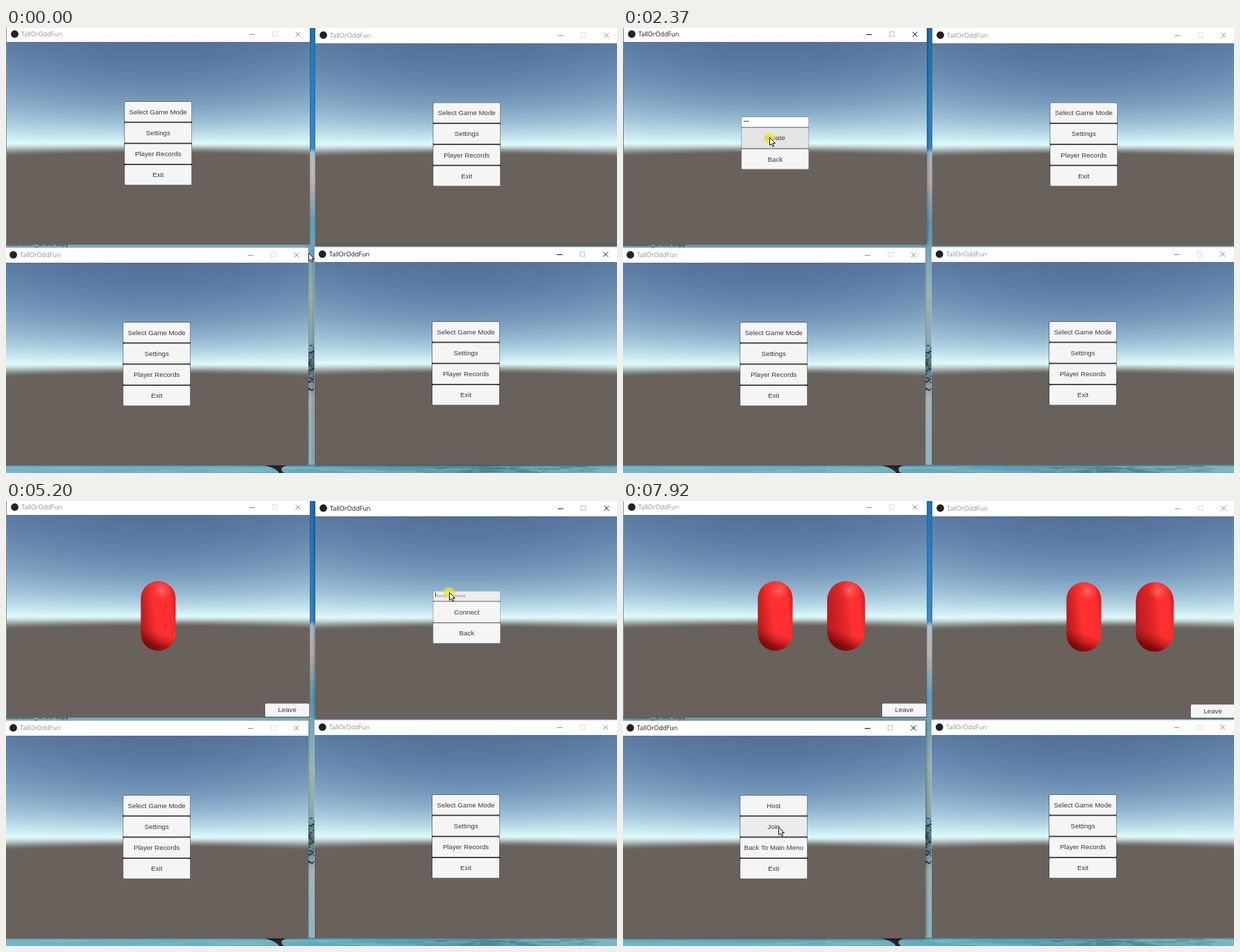
Recreate the animation shown at these times as an HTML page with a canvas. Size 877 px wide and 639 px high, loop 7.99 s.

```html
<!DOCTYPE html>
<html lang="en">
<head>
<meta charset="utf-8">
<title>Four game windows</title>
<style>
html, body { margin: 0; width: 877px; height: 639px; overflow: hidden; }
canvas { display: block; }
</style>
</head>
<body>
<canvas id="stage" width="877" height="639"></canvas>
<script>
const LOOP = 7990, CLICK = 220, TYPING = 5340;
const c = document.getElementById('stage').getContext('2d');
const UI = '"Liberation Sans", Arial, sans-serif';

const WINDOWS = [[0, 0], [443, 1.5], [-2, 317], [441.7, 316]];
const MENUS = {
  main: ['Select Game Mode', 'Settings', 'Player Records', 'Exit'],
  modes: ['Host', 'Join', 'Back To Main Menu', 'Exit']
};

// cursor stops: arrive, leave, x, y and, for clicks, window and screen opened
const STOPS = [
  [0, 70, 434, 323],
  [540, 690, 202, 121, 0, 'modes'],
  [740, 800, 200, 124, 0, 'create'],
  [1790, 2560, 210, 157, 0, 'game'],
  [3140, 3270, 672, 180],
  [3900, 4140, 660, 122, 1, 'modes'],
  [4330, 4550, 656, 148, 1, 'connect'],
  [5110, 5330, 636, 131, 1, 'connect'],
  [5970, 6380, 654, 155, 1, 'game'],
  [6870, 6890, 194, 357],
  [7200, 7420, 213, 432, 2, 'modes'],
  [7910, LOOP, 223, 468]
];

const smooth = u => {
  u = Math.min(1, Math.max(0, u));
  return u * u * (3 - 2 * u);
};
const mix = (a, b, u) => a + (b - a) * u;

function cursorAt(t) {
  const i = STOPS.findIndex(([, leave]) => t < leave);
  const [arrive, , x, y] = STOPS[i];
  if (t >= arrive) return [x, y];
  const [, left, x0, y0] = STOPS[i - 1];
  const e = smooth((t - left) / (arrive - left));
  return [mix(x0, x, e), mix(y0, y, e)];
}

// replay the clicks up to time t
function stateAt(t) {
  const state = { screens: ['main', 'main', 'main', 'main'], active: 3, press: 0 };
  for (const [arrive, leave, , , win, screen] of STOPS) {
    const down = Math.max(arrive, leave - CLICK);
    if (!screen || t < down) continue;
    state.active = win;
    if (t < leave) state.press = Math.min(1, (t - down + 1) / 80);
    else state.screens[win] = screen;
  }
  return state;
}

function rect(x, y, w, h, fill) {
  c.fillStyle = fill;
  c.fillRect(x, y, w, h);
}

function round(x, y, w, h, r, fill) {
  c.fillStyle = fill;
  c.beginPath();
  c.roundRect(x, y, w, h, r);
  c.fill();
}

function disc(x, y, r, fill) {
  c.fillStyle = fill;
  c.beginPath();
  c.arc(x, y, r, 0, 7);
  c.fill();
}

function text(s, x, y, font, fill, align = 'left') {
  c.font = font;
  c.fillStyle = fill;
  c.textAlign = align;
  c.fillText(s, x, y);
}

function line(x0, y0, x1, y1, color) {
  c.strokeStyle = color;
  c.lineWidth = 1;
  c.beginPath();
  c.moveTo(x0, y0);
  c.lineTo(x1, y1);
  c.stroke();
}

function ramp(x0, y0, x1, y1, stops) {
  const g = c.createLinearGradient(x0, y0, x1, y1);
  stops.forEach(([p, color]) => g.addColorStop(p, color));
  return g;
}

function layer(w, h, paint) {
  const canvas = document.createElement('canvas');
  canvas.width = w;
  canvas.height = h;
  paint(canvas.getContext('2d'));
  return canvas;
}

// haze grows exponentially towards the horizon, then blends into the ground
function skyColor(y) {
  const haze = (zenith, horizon, depth) =>
    mix(zenith, horizon, Math.exp(Math.min(y, 0) / depth));
  const sky = [haze(74, 222, 52), haze(97, 250, 62), haze(136, 251, 76)];
  const ground = [104, 97, 92], g = smooth((y + 1) / 16);
  return `rgb(${sky.map((v, i) => mix(v, ground[i], g))})`;
}

// equal elevations spread apart away from the middle of the view
const SKY = layer(435, 291, s => {
  for (let x = 0; x < 435; x++) {
    const reach = Math.hypot(1, (x - 217) / 251);
    for (let y = 0; y < 291; y++) {
      s.fillStyle = skyColor((y - 145) / reach);
      s.fillRect(x, y, 1, 1);
    }
  }
});

function streaks(x, y, w, h, n, color) {
  let seed = 7;
  const rnd = () => (seed = seed * 16807 % 2147483647) / 2147483647;
  for (let i = 0; i < n; i++) {
    rect(x + rnd() * w, y + rnd() * h, 3 + rnd() * w / 8, 1.5, color);
  }
}

function desktop() {
  rect(0, 0, 877, 639, '#7fafbc');
  rect(430, 0, 16, 639, ramp(0, 0, 0, 639, [[0, '#2273b4'], [.27, '#3c8ac6'],
    [.28, '#a9c3d2'], [.34, '#c4b5ad'], [.44, '#5d9fc0'], [.6, '#9db5b0'],
    [.71, '#8ba9b0'], [.76, '#55737f'], [.83, '#a4b5b8'], [1, '#8db6c2']]));
  streaks(430, 455, 12, 70, 45, '#2b3d4a');
  text('Illustration_of the copy', 0, 313, '9px ' + UI, '#263038');
  rect(0, 627, 877, 12, ramp(0, 0, 877, 0,
    [[0, '#74b4c8'], [.5, '#65a9bd'], [.77, '#5b94a5'], [1, '#79b4c4']]));
  streaks(0, 628, 877, 11, 30, 'rgba(150,205,215,.3)');
  streaks(600, 628, 240, 11, 30, 'rgba(45,85,100,.3)');
  rect(0, 627, 877, 2, 'rgba(50,75,85,.35)');
  c.fillStyle = '#2a2227';
  c.beginPath();
  c.moveTo(371, 628);
  c.lineTo(403, 628);
  c.quadraticCurveTo(390, 632, 399, 639);
  c.lineTo(392, 639);
  c.quadraticCurveTo(388, 632, 371, 628);
  c.fill();
}

function frame(active) {
  c.shadowColor = active ? 'rgba(0,0,0,.55)' : 'rgba(0,0,0,.3)';
  c.shadowBlur = active ? 7 : 3;
  rect(1, -1.5, 435, 312, '#fff');
  c.shadowBlur = 0;
  c.shadowColor = 'transparent';
  const ink = active ? '#111' : '#8b8f92';
  disc(12.5, 8.7, 5.4, '#222');
  text('TallOrOddFun', 22, 12, '9px "Open Sans", sans-serif', ink);
  line(349, 9.5, 357, 9.5, ink);
  c.strokeStyle = active ? '#b5c1bf' : '#dcdcdc';
  c.strokeRect(382.5, 5.5, 6.5, 6.5);
  line(415.5, 5.5, 422.5, 12.5, ink);
  line(422.5, 5.5, 415.5, 12.5, ink);
  c.drawImage(SKY, 1, 20);
}

// a control darkens under the mouse and again while pressed
function control(x, y, w, h, mouse, base = 245) {
  const [mx, my, press] = mouse;
  const inside = mx > x && mx < x + w && my > y && my < y + h;
  const v = inside ? 236 - 18 * press : base;
  round(x, y, w, h, 1.5, `rgb(${v},${v},${v})`);
}

function button(label, x, y, w, h, mouse) {
  control(x, y, w, h, mouse);
  text(label, x + w / 2, y + h / 2 + 3.2, '9.7px ' + UI, '#3a3a3a', 'center');
}

function menu(labels, mouse) {
  round(169.7, 105.5, 97, 120, 2, '#33373b');
  labels.forEach((s, i) => button(s, 170.3, 106 + i * 30.25, 96, 28.6, mouse));
}

function panel(action, typed, caret, mouse) {
  round(169.7, 127.5, 97, 76, 2, '#7b8083');
  control(170.3, 128, 96, 14, [mouse[0], mouse[1], 0], 253);
  if (typed) text('*'.repeat(typed), 173, 136.6, 'bold 5px ' + UI, '#444');
  else text('Server password', 174, 136, 'italic 5.6px ' + UI, '#8c8c8c');
  if (caret) rect(173, 130, 1, 6, '#333');
  button(action, 170.3, 143.3, 96, 29.2, mouse);
  button('Back', 170.3, 174, 96, 28.6, mouse);
}

// lit is where, across the width, the left shade gives way to full light
function capsule(x, w, lit) {
  const y = 115, h = 100, r = w / 2;
  const coat = fill => round(x, y, w, h, r, fill);
  coat(ramp(x, y + 50, x + w, y + 44, [[0, '#b81c1e'], [lit / 2, '#cf2123'],
    [lit, '#ea282a'], [lit + .12, '#fd2f31'], [.88, '#fd2f31'], [1, '#d92426']]));
  coat(ramp(x + r + 5, y + 76, x + r - 3, y + h, [[0, 'rgba(90,0,0,0)'],
    [.4, 'rgba(100,0,0,.3)'], [.7, 'rgba(85,0,0,.6)'], [1, 'rgba(75,0,0,.7)']]));
  const glow = c.createRadialGradient(x + r + 5, y + 13, 0, x + r + 5, y + 13, 14);
  glow.addColorStop(0, 'rgba(255,150,145,.55)');
  glow.addColorStop(1, 'rgba(255,110,110,0)');
  coat(glow);
}

function game(joined, mouse) {
  capsule(193.5, 50, .3);
  if (joined) capsule(293, 54.5, .5);
  round(371.5, 290, 64.5, 20.5, 2, '#5a5653');
  button('Leave', 372, 290.7, 63.3, 19, mouse);
}

function pointer(x, y, clicked) {
  if (clicked) disc(x, y + 1, 8, 'rgba(240,230,50,.75)');
  c.save();
  c.translate(x + .5, y + .5);
  const arrow = new Path2D('M0 0V11L2.6 8.7 4.4 12.8 6.2 12 4.5 8H8Z');
  c.fillStyle = '#fff';
  c.fill(arrow);
  c.strokeStyle = '#111';
  c.lineWidth = 1;
  c.stroke(arrow);
  c.restore();
}

function draw(t) {
  const [x, y] = cursorAt(t);
  const { screens, active, press } = stateAt(t);
  const typed = t < TYPING ? 0 : Math.min(4, 1 + Math.floor((t - TYPING) / 90));
  const caret = t > TYPING - CLICK && !typed;

  desktop();
  WINDOWS.forEach(([ox, oy], i) => {
    const mouse = [x - ox, y - oy, press], screen = screens[i];
    c.save();
    c.translate(ox, oy);
    frame(i === active);
    if (MENUS[screen]) menu(MENUS[screen], mouse);
    if (screen === 'create') panel('Create', 4, false, mouse);
    if (screen === 'connect') panel('Connect', typed, caret, mouse);
    if (screen === 'game') game(screens[1] === 'game', mouse);
    c.restore();
  });
  pointer(x, y, press > 0);
}

const start = performance.now();
function tick() {
  draw((performance.now() - start) % LOOP);
  requestAnimationFrame(tick);
}
tick();
</script>
</body>
</html>
```
